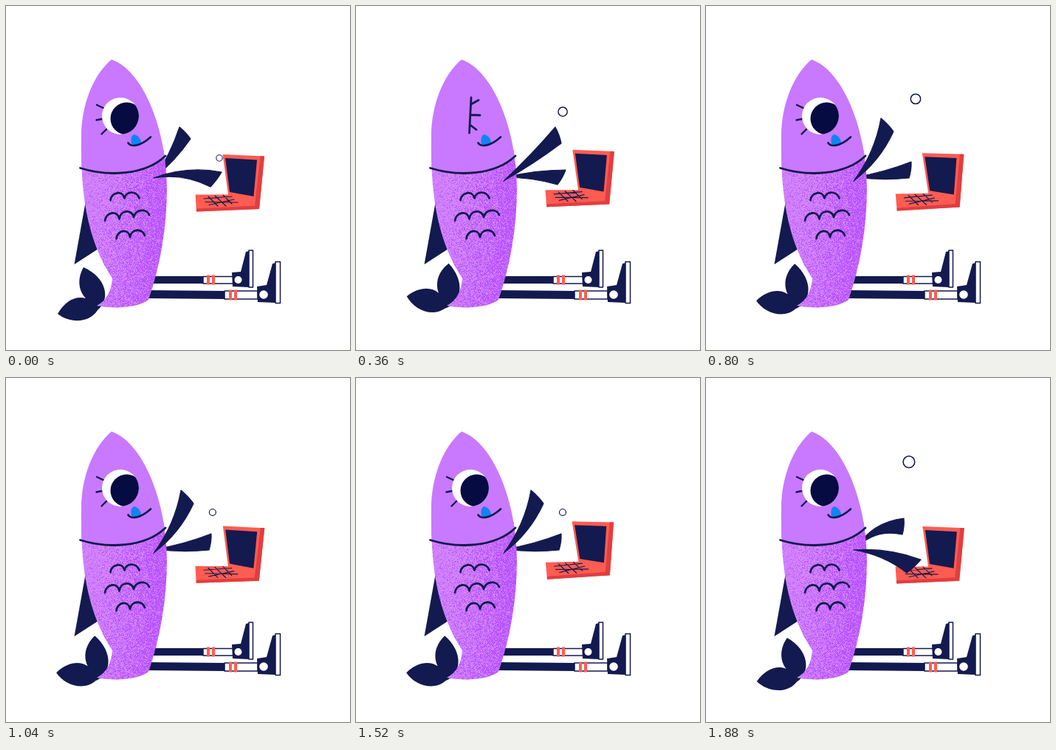
An HTML page with a canvas for the animation above (1.92 s loop, 466 by 466 pixels).

```html
<!DOCTYPE html>
<html lang="en">
<head>
<meta charset="utf-8">
<title>Fish typing on a laptop</title>
<style>
html, body { margin: 0; width: 100%; height: 100%; overflow: hidden; background: #fff; }
canvas { display: block; }
</style>
</head>
<body>
<canvas id="stage" width="466" height="466"></canvas>
<script>
const ctx = document.getElementById('stage').getContext('2d');
const NAVY = '#131a4f', RED = '#ff5c52', TAU = Math.PI * 2;
const STEP = 40, STEPS = 48;

const fill = (d, color) => { ctx.fillStyle = color; ctx.fill(new Path2D(d)); };
const line = (d, width = 2.8, color = NAVY) => {
  ctx.lineWidth = width;
  ctx.strokeStyle = color;
  ctx.stroke(new Path2D(d));
};
const oval = (x, y, rx, ry, color) => {
  ctx.beginPath();
  ctx.ellipse(x, y, rx, ry, 0, 0, TAU);
  ctx.fillStyle = color;
  ctx.fill();
};
const turn = (x, y, degrees) => {
  ctx.translate(x, y);
  ctx.rotate(degrees * Math.PI / 180);
  ctx.translate(-x, -y);
};

const BODY = new Path2D('M143 72.5C118 93 102 135 102 176C101 250 108 314 144 369' +
  'C143 386 136 399 123 406C145 410 176 410 193 398C209 352 218 300 218 246C218 170 187 88 143 72.5Z');

// Grainy belly, denser violet towards the right
const grain = document.createElement('canvas');
grain.width = grain.height = 466;
{
  const g = grain.getContext('2d');
  let seed = 7;
  const random = () => (seed = seed * 16807 % 2147483647) / 2147483647;
  for (let y = 195; y < 412; y++) {
    for (let x = 98; x < 222; x++) {
      const violet = 0.03 + 0.75 * ((x - 98) / 120) ** 1.5 + 0.1 * (y - 200) / 200;
      g.fillStyle = random() < violet ? '#b952ff' : random() < 0.3 ? '#da8ef6' : '#cd7dfb';
      g.fillRect(x, y, 1, 1);
    }
  }
}

// Each pose: two corners of the hand, then the bend of the arm
const FRONT = [
  [292, 225, 277, 245, 13], [275, 182, 272, 207, 9], [237, 152, 254, 170, -11],
  [270, 164, 278, 186, -3], [294, 204, 286, 227, 12], [291, 246, 272, 264, 10]
];
const BACK = [
  [235, 164, 250, 180, -5], [245, 172, 259, 187, -8], [278, 211, 275, 233, -4],
  [284, 222, 273, 242, 5], [284, 203, 277, 225, 14], [268, 190, 266, 212, 19]
];

function arm(x, y, [ax, ay, bx, by, bend]) {
  const bow = (px, py) => {
    const dx = px - x, dy = py - y, k = bend / Math.hypot(dx, dy);
    return [x + dx / 2 + dy * k, y + dy / 2 - dx * k];
  };
  ctx.beginPath();
  ctx.moveTo(x, y);
  ctx.quadraticCurveTo(...bow(ax, ay), ax, ay);
  ctx.quadraticCurveTo((ax + bx) / 2 + 2, (ay + by) / 2, bx, by);
  ctx.quadraticCurveTo(...bow(bx, by), x, y);
  ctx.fillStyle = ctx.strokeStyle = NAVY;
  ctx.lineWidth = 1.2;
  ctx.fill();
  ctx.stroke();
}

function legs() {
  fill('M196 366H268V376H196Z', NAVY);
  fill('M267 366.5H308V376H267Z', '#fff');
  line('M267 366.5H308V376H267Z', 1.5);
  fill('M272 364.5h4v13h-4zM279 364.5h4v13h-4z', RED);
  fill('M306 361L318 360L325 333L329 332V381L307 380Z', NAVY);
  fill('M329 331H334.5V381H329Z', '#fff');
  line('M329 331H334.5V381H329Z', 1.5);
  oval(314.5, 371, 5, 5, '#fff');

  fill('M192 385L297 386V397L192 396Z', NAVY);
  fill('M296 386H341V397H296Z', '#fff');
  line('M296 386H341V397H296Z', 1.5);
  fill('M302 384.5h4v14h-4zM309 384.5h4v14h-4z', RED);
  fill('M340 380L353 378L361 349L365 348V402L341 401Z', NAVY);
  fill('M365 346.5H371.5V402.5H365Z', '#fff');
  line('M365 346.5H371.5V402.5H365Z', 1.5);
  oval(349, 391, 5.8, 5.8, '#fff');
}

function tail(phase) {
  ctx.save();
  turn(128, 402, 11.5 - 11.5 * Math.cos(phase / 6 * TAU));
  fill('M105 354C98 366 96 383 108 396C95 392 80 399 70 417C86 430 113 430 124 412C142 398 137 368 105 354Z', NAVY);
  ctx.restore();
}

function eye(beat) {
  if (beat > 8 && beat < 14) {
    line('M156 124L153.5 172M156 133L166 127.5M155.5 147.5L168 148M154.5 161L163 167.5');
    return;
  }
  line('M123 134L132.5 138.5M122.5 154.5L130.5 153M129.5 173.5L136.5 166.5', 2.4);
  ctx.save();
  if (beat === 7 || beat === 8) {
    ctx.filter = 'blur(2px)';
    ctx.translate(155, 0);
    ctx.scale(beat === 7 ? 0.96 : 0.4, 1);
    ctx.translate(-155, 0);
  }
  oval(155, 149, 25, 25, '#fff');
  ctx.clip();
  oval(163.5, 152.5, 22, 22, '#060b42');
  ctx.restore();
}

function fish(beat) {
  ctx.save();
  ctx.clip(BODY);
  ctx.drawImage(grain, 0, 0);
  fill('M90 60H230V190L217 202C188 230 135 231 100 219H90Z', '#c879ff');
  ctx.restore();
  line('M100.5 219.5C137 231 188 230 216 203');
  fill('M170 187C168 179 171 174 174 174C179 175.5 183 180 183 186Q176 190 170 187Z', '#0f85f5');
  line('M165.5 185.5C169 191 181 191 196 177.5', 2.7);
  eye(beat);
  line('M141.5 263C143 252 158 249 160.5 260.5C163 249 178 251 180.5 260.5' +
    'M134 290.5C136 279 151 276 153.5 288.5C155 276 171 275 173 286C175 275 191 274 194 283' +
    'M149.5 315C151 303 166 301 168 313C170 301 185 301 188 311');
}

function laptop(beat) {
  if (beat > 3 && beat < 9) {
    ctx.save();
    ctx.translate(0, (beat - 7) * 3.5);
    fill('M307 282Q320 291 330 277Q320 286 307 282Z', '#080c2c');
    ctx.restore();
  }
  ctx.save();
  ctx.translate(0, 3.7 * (Math.cos(beat / 24 * TAU) - 1));
  turn(304, 240, 1.05 * Math.cos((beat - 4) / 24 * TAU) - 0.5);
  fill('M293.5 201L350 203.5L343 275L258 278.5L256.5 255.5L301 255.5Z', RED);
  fill('M344.5 203.2L350 203.5L343 275L258 278.5V274.5L337 270.5Z', '#e23d3f');
  fill('M297 206L340 208.5L335.5 258L303 252Z', NAVY);
  line('M268 261L306 258M270 265.5L314 266M275 269.5L309 262M274 258L287 271M283 257L298 271M294 256L306 268', 1.2);
  ctx.restore();
}

// Each bubble: birth step, rise per step, sideways drift, sideways curve
const BUBBLES = [
  [0, 6.75, -0.11, -0.098], [9.8, 7.6, -3.87, 0.331],
  [22.7, 7.2, -2.77, 0], [34.7, 7.2, -3.31, 0.176]
];

function bubbles(step) {
  for (const [birth, rise, drift, curve] of BUBBLES) {
    const age = step - birth;
    if (age < 0 || age > 13.2) continue;
    const sq = age * age;
    ctx.beginPath();
    ctx.arc(289 + drift * age + curve * sq, 206 - rise * age - 0.025 * sq, 4.2 + 0.024 * sq, 0, TAU);
    ctx.fillStyle = '#fff';
    ctx.fill();
    ctx.lineWidth = 1.1 + age * 0.04;
    ctx.strokeStyle = NAVY;
    ctx.stroke();
  }
}

function draw(now) {
  const step = Math.floor(now / STEP) % STEPS, phase = step % 6, beat = step % 24;
  ctx.fillStyle = '#fff';
  ctx.fillRect(0, 0, 466, 466);
  ctx.lineCap = ctx.lineJoin = 'round';
  legs();
  fill('M108 264L92.5 350L125 329Z', NAVY);
  tail(phase);
  arm(202, 232, BACK[phase]);
  fish(beat);
  laptop(beat);
  bubbles(step);
  arm(200, phase > 0 && phase < 4 ? 237 : 233, FRONT[phase]);
}

const start = performance.now();
function tick() {
  draw(performance.now() - start);
  requestAnimationFrame(tick);
}
tick();
</script>
</body>
</html>
```
